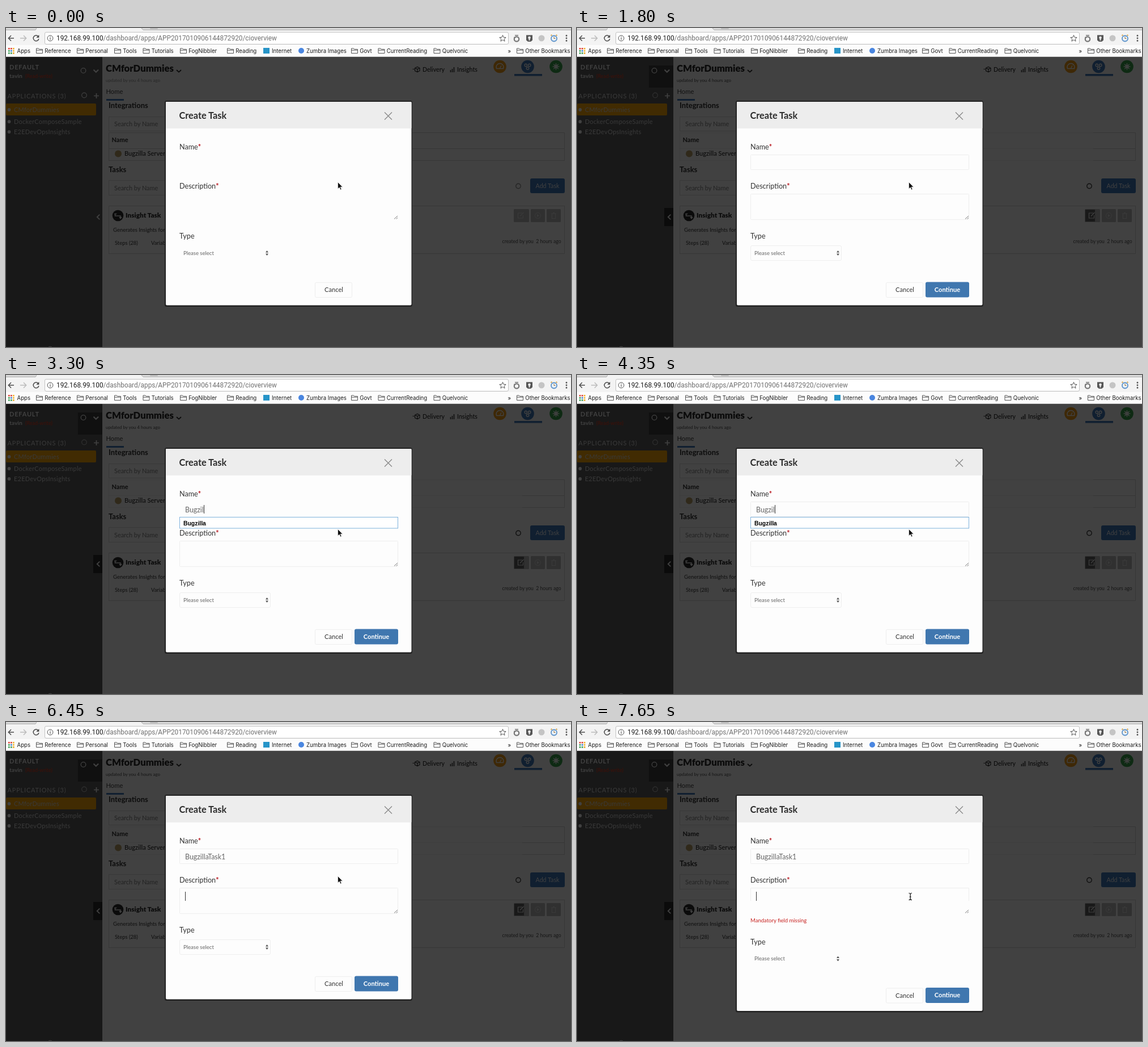
Animation, 997 px wide and 562 px high, one loop 8000 ms. Source, as an HTML page:

```html
<!DOCTYPE html>
<html lang="en">
<head>
<meta charset="utf-8">
<title>Create Task</title>
<style>
  html, body { margin: 0; width: 100%; height: 100%; overflow: hidden; background: #414141; }
  svg { display: block; width: 997px; height: 562px; }
  text { font-family: Lato, sans-serif; white-space: pre; }
  .ui { font-family: Inter, sans-serif; }
  .url { font-family: Roboto, sans-serif; }
  .list { font-family: "Liberation Sans", Arial, sans-serif; }
</style>
</head>
<body>
<svg id="stage" viewBox="0 0 997 562" xmlns="http://www.w3.org/2000/svg"></svg>
<script>
const LOOP = 8000;

// Colours of the page as they appear behind the dark overlay.
const DIM = {
  white: '#414141', grey: '#3a3a3a', orange: '#412b02', amber: '#3e2806',
  blue: '#101f30', green: '#0e2a13', red: '#411008', side: '#181818',
};

const attrs = o => Object.entries(o).map(([k, v]) => `${k}="${v}"`).join(' ');
const text = (x, y, size, str, fill = '#0c0c0c', more = {}) =>
  `<text x="${x}" y="${y}" font-size="${size}" fill="${fill}" ${attrs(more)}>${str}</text>`;
const rect = (x, y, w, h, fill, more = {}) =>
  `<rect x="${x}" y="${y}" width="${w}" height="${h}" fill="${fill}" ${attrs(more)}/>`;
const box = (x, y, w, h, stroke, more = {}) =>
  rect(x + .5, y + .5, w - 1, h - 1, 'none', { stroke, ...more });
const disc = (x, y, r, fill, more = {}) =>
  `<circle cx="${x}" cy="${y}" r="${r}" fill="${fill}" ${attrs(more)}/>`;
const ring = (x, y, r, stroke, width = 1, more = {}) =>
  disc(x, y, r, 'none', { stroke, 'stroke-width': width, ...more });
const line = (d, stroke, width = 1, more = {}) =>
  `<path d="${d}" fill="none" stroke="${stroke}" stroke-width="${width}" ${attrs(more)}/>`;
const shape = (d, fill, more = {}) => `<path d="${d}" fill="${fill}" ${attrs(more)}/>`;
const group = (id, ...parts) => `<g id="${id}">${parts.join('')}</g>`;
const bold = { 'font-weight': 700 };
const black = { 'font-weight': 900 };
const medium = { 'font-weight': 500 };

function browser() {
  const ink = '#4d4d4d';
  const folder = x => line(`M${x + .5} 36h4l1.2 1.5h5.8v7h-11zM${x + .5} 39.2h11`, '#555');
  const mark = (x, str) => text(x, 43.6, 9.65, str, '#1c1c1c', { class: 'ui' });
  const folders = [[53, 'Reference'], [125, 'Personal'], [191, 'Tools'], [241.5, 'Tutorials'],
    [307, 'FogNibbler'], [390, 'Reading'], [609, 'Govt'], [656.5, 'CurrentReading'],
    [754.5, 'Quelvonic'], [901, 'Other Bookmarks']];
  const dots = ['#e0443a', '#e0443a', '#f2b632', '#3f9e57', '#4285d6', '#f2b632', '#3f9e57', '#3f9e57', '#e8a92c'];

  return rect(0, 0, 997, 51, '#fcfcfc')
    + rect(0, 0, 997, 30, '#f3f3f3')
    + rect(0, 0, 997, 3, '#d9d9d9')
    + shape('M52 0H238L241 3H54z', '#f3f3f3')
    + line('M0 3.5H52L54 0M239 0l3 3.5H997', '#adadad')
    + rect(254, 0, 14, 2, '#bbb', { rx: 1 })
    + rect(68.5, 7.5, 818, 21, '#fff', { rx: 2.5, stroke: '#c2c2c2' })
    + line('M14 18H4.5M9 13.2L4.3 18L9 22.8', ink, 1.5)
    + line('M25 18h10.5M31 13.2L35.7 18L31 22.8', '#bcbcbc', 1.5)
    + line('M57 14.9A4.9 4.9 0 1 0 57.9 19', ink, 1.5) + shape('M58.4 12v5h-5z', ink)
    + ring(78, 18, 4.9, '#555') + rect(77.4, 17.3, 1.2, 3.4, '#555') + rect(77.4, 15.1, 1.2, 1.2, '#555')
    + text(89, 22, 11.85, '192.168.99.100<tspan fill="#707070">/dashboard/apps/APP2017010906144872920/cioverview</tspan>', '#1b1b1b', { class: 'url' })
    + line('M876.5 12.6l1.6 3.8 4.1.3-3.1 2.6 1 4-3.6-2.2-3.6 2.2 1-4-3.1-2.6 4.1-.3z', '#555')
    + ring(901, 19.5, 4.2, '#777', 2.2) + line('M898 13h6M896.4 16l2 1.8', '#777', 1.4)
    + shape('M918 12.5h11v9l-3 2.5h-5l-3-2.5z', '#555') + disc(923.5, 17, 2.3, '#eee') + rect(922.5, 19, 2, 3, '#eee')
    + disc(945, 18, 5.5, '#c4c4c4')
    + disc(967, 18.5, 5, '#e8f1fa', { stroke: '#5c92c9', 'stroke-width': 1.8 })
    + line('M967 15.5v3h2.4', '#a36b25') + line('M961.5 13.5l2-1.5M972.5 13.5l-2-1.5', '#d6a347', 1.8)
    + [13.5, 18, 22.5].map(y => disc(989, y, 1.4, '#555')).join('')
    + dots.map((c, i) => rect(4 + i % 3 * 4, 35 + Math.floor(i / 3) * 4, 2.7, 2.7, c)).join('')
    + mark(19.5, 'Apps')
    + folders.map(([x, name]) => folder(x) + mark(x + 15.3, name)).join('')
    + rect(454, 35, 11, 10, '#2795c8') + mark(469, 'Internet')
    + disc(521, 40, 5, '#4a86e0') + mark(530, 'Zumbra Images')
    + mark(885.5, '»')
    + line('M0 50.5H997', '#c9c9c9');
}

function sidebar() {
  const item = (y, name) => disc(5.5, y - 4, 2.9, DIM.white)
    + text(14, y, 11, name, DIM.grey, { 'letter-spacing': .25 });
  return rect(0, 51, 170, 511, DIM.side)
    + group('sideShade', rect(127, 66, 43, 39, '#101010'), rect(154, 317, 16, 32, '#0b0b0b'))
    + text(6, 72.5, 11, 'DEFAULT', DIM.white, { ...bold, 'letter-spacing': .8 })
    + text(6, 88, 10.3, 'tavin', DIM.white, bold)
    + text(34, 88, 9, '(Read-write)', DIM.red)
    + ring(136.5, 75, 4.3, DIM.white, 1.3)
    + line('M154.5 73.5l4.3 4.3 4.3-4.3', DIM.white, 2.2)
    + text(2.5, 123.5, 11, 'APPLICATIONS (3)', DIM.grey, { 'letter-spacing': .8 })
    + ring(138, 118.5, 4.3, DIM.white, 1.2, { id: 'appRing' })
    + line('M155 119.5h9M159.5 115v9', DIM.white, 1.7)
    + rect(0, 133, 159, 21, DIM.orange, { rx: 2 })
    + item(148, 'CMforDummies')
    + item(169, 'DockerComposeSample')
    + item(187, 'E2EDevOpsInsights')
    + line('M165.3 328.7l-4.6 4.3 4.6 4.3', DIM.white, 1.8)
    + line('M75 562q3-2 6 0', DIM.white);
}

function page() {
  const rule = '#363636';
  const tool = (x, w) => rect(x, 319, w, 23, '#303030', { rx: 1.5 });
  const spokes = [0, 45, 90, 135].map(a => line('M970.5 62v12', DIM.white, 1.3, { transform: `rotate(${a} 970.5 68)` })).join('');
  return text(176, 77, 16.7, 'CMforDummies', '#0a0a0a', black)
    + line('M301 74l4 3.6 4-3.6', '#0a0a0a', 1.7)
    + text(176, 94.8, 7.9, 'updated by you 4 hours ago', '#151515', { id: 'updated' })
    + text(176.5, 116, 11.2, 'Home', '#111')
    + rect(177, 125, 31, 3, DIM.blue)
    + text(181, 140.5, 13, 'Integrations', '#0c0c0c', bold)
    + box(181, 156, 250, 26, '#383838') + text(191, 173, 10.9, 'Search by Name', '#222')
    + group('tableLines', line('M911 184.5H181.5V234M181 212.5H911M181 233.5H911', rule))
    + line('M911 184.5H985.5V234M911 212.5H985M911 233.5H985', rule)
    + text(186.5, 201, 11, 'Name', '#0c0c0c', bold)
    + disc(198, 221.5, 6, '#30291a')
    + text(209, 225.3, 11.1, 'Bugzilla Server', '#0c0c0c', medium)
    + text(181, 253.5, 13, 'Tasks', '#0c0c0c', bold)
    + box(181, 268, 250, 27, '#383838') + text(191, 286, 10.9, 'Search by Name', '#222')
    + ring(904, 278.5, 7.5, '#363636', 1.2, { id: 'halo' })
    + ring(904, 278.5, 4.2, '#222', 1.4, { id: 'spinner' })
    + rect(925, 265, 61, 26, DIM.blue, { rx: 3 })
    + text(955.5, 281.5, 10.7, 'Add Task', DIM.white, { 'text-anchor': 'middle' })
    + box(181, 313, 805, 85, '#373737')
    + disc(197.5, 330.5, 9.8, '#0b0b0b')
    + line('M192.5 327.5v3.4h9.5v3.6M195.3 327.5h-4M200 333l2 2.5 2-2.5', DIM.white, 1.5)
    + text(211, 334, 11.8, 'Insight Task', '#0b0b0b', black)
    + text(189, 358.5, 9.5, 'Generates Insights for all', '#0f0f0f')
    + text(192, 381.5, 9.4, 'Steps (28)', '#0f0f0f')
    + text(256, 381.5, 9.4, 'Variables', '#0f0f0f')
    + text(979.5, 379.3, 8.6, 'created by you  2 hours ago', '#161616', { 'text-anchor': 'end' })
    + tool(896, 27) + tool(926, 25) + tool(954, 25)
    + group('editShade', rect(897, 320, 17, 21, '#191919'))
    + line('M911 326h-7.5v9h9v-5M907 331.5l6.5-6.5', DIM.white, 1.2, { id: 'editIcon' })
    + ring(938.5, 330.5, 5, DIM.grey) + shape('M937 328l4 2.5-4 2.5z', DIM.grey)
    + line('M962 327h9M963.3 327v8.5h6.4V327M965 325.5h3', DIM.grey, 1.2)
    + line('M717.5 72.5h3M721.5 70.5l4.5-2 4 2v5l-4 2-4.5-2zl4.5 2 4-2M726 72.5v5', '#0e0e0e', 1.2)
    + text(735, 77, 10.6, 'Delivery', '#0b0b0b', medium)
    + line('M784.5 78v-4M787.5 78v-6M790.5 78v-9', '#0e0e0e', 1.5)
    + text(796, 77, 10.6, 'Insights', '#0b0b0b', medium)
    + disc(871.5, 68, 11.3, DIM.amber)
    + line('M865.5 71.5a6.5 6.5 0 1 1 12 0zM871.5 71l2.5-5', DIM.white, 1.3)
    + disc(920.5, 68, 11.3, DIM.blue)
    + [[917.3, 65.5], [923.7, 65.5], [920.5, 71]].map(([x, y]) => ring(x, y, 2.2, DIM.white, 1.4)).join('')
    + rect(897, 81, 49, 3.5, DIM.blue)
    + disc(970.5, 68, 11.3, DIM.green) + spokes + ring(970.5, 68, 3, DIM.white);
}

function dialog() {
  const edge = '#eee';
  const label = (y, str, star) => text(306, y, 12.6, str + (star ? '<tspan fill="#b8141c" font-weight="700">*</tspan>' : ''), '#333');
  return rect(280, 128, 437, 363, '#222', { id: 'shadow', rx: 3 })
    + rect(282, 130, 433.5, 358.5, '#fdfdfd', { id: 'panel', rx: 2 })
    + rect(282, 130, 433.5, 47, '#ededed', { rx: 1 })
    + text(305.5, 160, 16.3, 'Create Task', '#2c2c2c', bold)
    + line('M668 148.5l13 13M681 148.5l-13 13', '#8a8a8a', 1.4)
    + label(213.5, 'Name', true)
    + box(306, 223, 386, 27, edge, { id: 'nameBox', rx: 1 })
    + text(316, 241.7, 12.4, '', '#666', { id: 'nameText' })
    + rect(316, 229, 1, 15, '#333', { id: 'nameCaret' })
    + label(283, 'Description', true)
    + box(306, 292, 386, 46, edge, { id: 'descBox', rx: 1 })
    + line('M306.5 315V292.5H691.5V315', edge, 1, { id: 'descTop' })
    + line('M685 336.5l6-5.5M688.5 336.5l2.5-2.3', '#777')
    + rect(316, 299, 1, 16, '#333', { id: 'descCaret' })
    + text(306, 353, 9.5, 'Mandatory field missing', '#c7211f', { id: 'error' })
    + group('suggest', rect(306.5, 250.5, 385, 19.5, '#fff', { stroke: '#7fb2dc' }),
      text(313, 265, 10.4, 'Bugzilla', '#000', { ...bold, class: 'list' }))
    + group('lower',
      label(371, 'Type'),
      box(306, 383, 161, 27, edge, { id: 'selectBox', rx: 2.5 }),
      text(313, 399.7, 9.55, 'Please select', '#666'),
      shape('M458 395.5l2.5-3.5 2.5 3.5zM458 397.5h5l-2.5 3.5z', '#555'),
      box(545, 448, 66, 27, edge, { rx: 2 }),
      text(578.5, 465, 11.1, 'Cancel', '#333', { 'text-anchor': 'middle' }),
      group('continue', rect(615, 447.5, 77, 27, '#4077af', { rx: 3 }),
        text(653.5, 464.7, 11.1, 'Continue', '#fff', { ...bold, 'text-anchor': 'middle' })));
}

const pointers =
  shape('M585.5 271.5v12l2.8-2.6 1.9 4.3 1.9-.9-1.9-4.1h3.8z', '#111', { id: 'arrow', stroke: '#fff', 'stroke-width': .7 })
  + line('M585.5 301.5q2.7 0 2.7 2v8q0 2-2.7 2M591 301.5q-2.8 0-2.8 2v8q0 2 2.8 2M586.7 308h3', '#111', 1.2, { id: 'beam' });

const stage = document.getElementById('stage');
stage.innerHTML = page() + sidebar() + browser() + dialog() + pointers;
const el = Object.fromEntries([...stage.querySelectorAll('[id]')].map(n => [n.id, n]));

// A mistyped letter is deleted before the word is finished.
const typing = [[0, ''], [2250, 'B'], [2550, 'Bu'], [2700, 'Bug'], [3000, 'Bugz'], [3150, 'Bugzi'],
  [3300, 'Bugzil'], [3450, 'Bugzila'], [4350, 'Bugzil'], [4500, 'Bugzill'], [4650, 'Bugzilla'],
  [4950, 'BugzillaT'], [5100, 'BugzillaTa'], [5250, 'BugzillaTas'], [5400, 'BugzillaTask'], [5700, 'BugzillaTask1']];

const show = (id, on) => el[id].setAttribute('visibility', on ? 'visible' : 'hidden');
const set = (id, name, value) => el[id].setAttribute(name, value);

function render(t) {
  const within = (a, b) => t >= a && t < b;
  const ready = t >= 1050;
  const failed = t >= 6600;
  const grow = failed ? 20.5 : 0;

  const name = typing.findLast(([at]) => t >= at)[1];
  if (el.nameText.textContent !== name) el.nameText.textContent = name;
  set('nameCaret', 'x', Math.round(316 + (name ? el.nameText.getComputedTextLength() : 0)));
  show('nameCaret', within(1350, 1800) || within(2250, 3900) || within(4350, 6300));
  show('nameBox', t >= 450 && !within(2250, 3450));
  show('suggest', within(2250, 3450) || within(4350, 4950));

  show('descBox', ready && !failed);
  show('descTop', failed);
  show('descCaret', within(6300, 7200) || t >= 7650);
  show('error', failed);
  show('selectBox', ready && !failed);
  show('continue', ready);
  set('lower', 'transform', `translate(0 ${grow})`);
  set('panel', 'height', 358.5 + grow);
  set('shadow', 'height', 363 + grow);

  show('sideShade', ready);
  show('editShade', ready);
  set('editIcon', 'stroke', ready ? DIM.white : DIM.grey);
  set('appRing', 'opacity', t < 600 ? 1 : .6);
  set('tableLines', 'opacity', t < 750 ? 1 : .3);
  show('halo', within(600, 1050));
  set('spinner', 'stroke', t < 600 ? '#262626' : '#101010');
  set('updated', 'opacity', t < 1350 ? .6 : 1);
  show('arrow', !failed);
  show('beam', failed);
}

function tick() {
  render(performance.now() % LOOP);
  requestAnimationFrame(tick);
}
tick();
</script>
</body>
</html>
```
